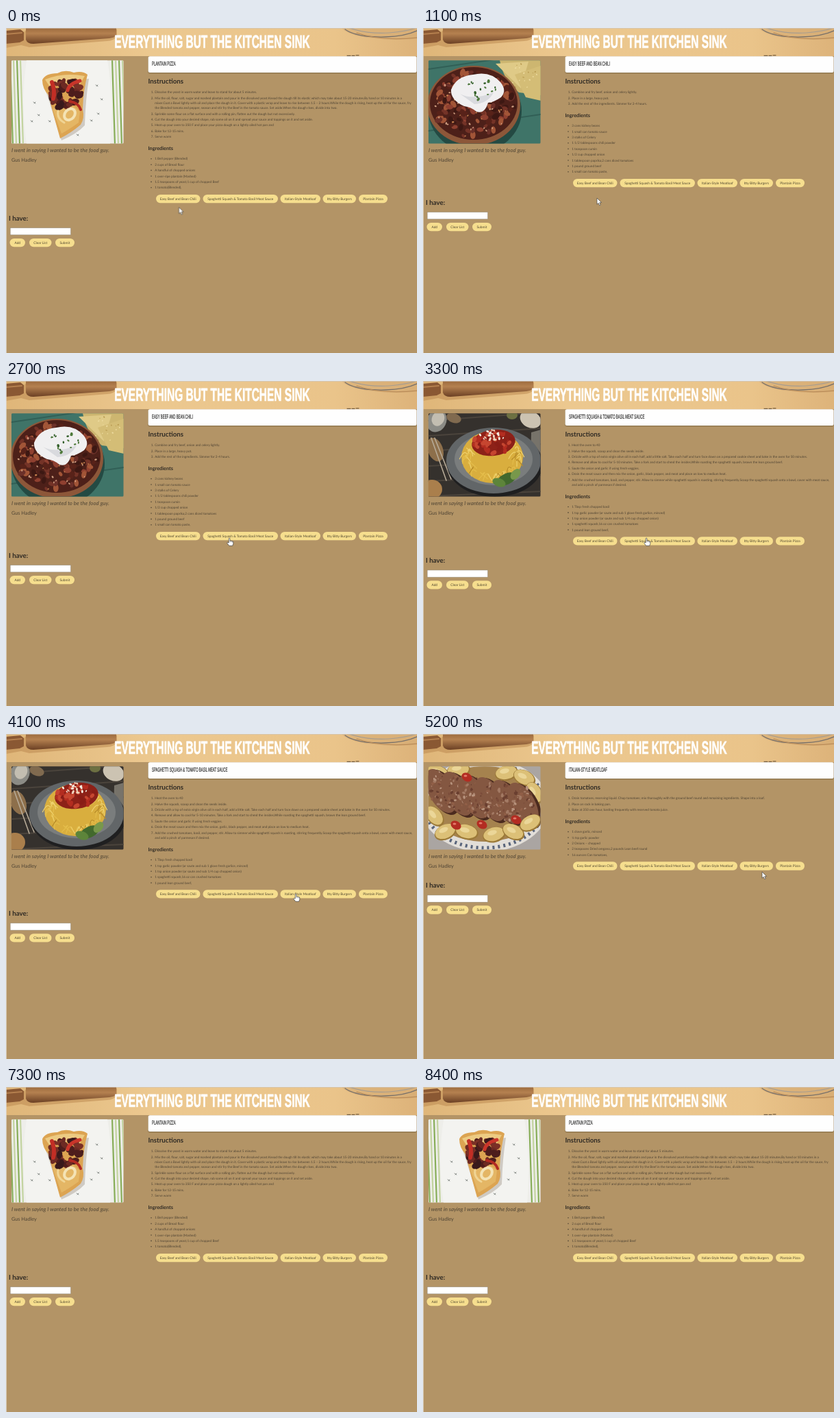
Recreate the animation shown at these times as an HTML page. Size 600 px wide and 474 px high, loop 8.5 s.

```html
<!DOCTYPE html>
<html lang="en">
<head>
<meta charset="utf-8">
<title>Everything but the kitchen sink</title>
<style>
html, body { margin: 0; width: 100%; height: 100%; overflow: hidden; background: #b39466; }
svg { display: block; width: 100vw; height: 100vh; text-rendering: geometricPrecision; }
text { font-family: Lato, "Open Sans", sans-serif; font-size: 4.69px; fill: #4f4434; white-space: pre; }
.h1 { font-size: 9.72px; font-weight: 700; fill: #2f2a24; }
.h2 { font-size: 7.3px; font-weight: 700; fill: #2f2a24; }
.name { font-size: 7.3px; }
.quote { font-size: 7.85px; font-style: italic; }
.btn { font-size: 4.9px; text-anchor: middle; fill: #4f452f; }
.num { text-anchor: end; }
.banner, .dish { font-family: "Liberation Sans", Arial, sans-serif; }
.banner { font-size: 26.4px; font-weight: 700; fill: #fff; stroke: #fff; stroke-width: .7px; text-anchor: middle; }
.dish { font-size: 8.8px; fill: #2a2a2a; stroke: #2a2a2a; stroke-width: .2px; }

.scene, .cursor, .hand, .arrow { animation: 8.5s step-end infinite; }
.scene { visibility: hidden; }
.pizza { animation-name: pizza; }
.chili { animation-name: chili; }
.squash { animation-name: squash; }
.loaf { animation-name: loaf; }
.burger { animation-name: burger; }
@keyframes pizza { 0% { visibility: visible } 12.94% { visibility: hidden } 77.64%, 100% { visibility: visible } }
@keyframes chili { 0% { visibility: hidden } 12.94% { visibility: visible } 34.11%, 100% { visibility: hidden } }
@keyframes squash { 0% { visibility: hidden } 34.11% { visibility: visible } 52.94%, 100% { visibility: hidden } }
@keyframes loaf { 0% { visibility: hidden } 52.94% { visibility: visible } 67.05%, 100% { visibility: hidden } }
@keyframes burger { 0% { visibility: hidden } 67.05% { visibility: visible } 77.64%, 100% { visibility: hidden } }

.cursor { animation-name: move; animation-timing-function: ease-in-out; }
@keyframes move {
  0%, 4.7% { transform: translate(252.5px, 261.5px) }
  10.59%, 13.5% { transform: translate(254px, 248px) }
  21.5%, 22.5% { transform: translate(296px, 241px) }
  29.4%, 39.5% { transform: translate(326px, 229px) }
  47.8%, 54.5% { transform: translate(423px, 233px) }
  60.6%, 61.4% { transform: translate(495px, 201px) }
  64.7%, 69% { transform: translate(490px, 191px) }
  74.5%, 79% { transform: translate(545px, 222.5px) }
  83.5%, 100% { transform: translate(604px, 226px) }
}
.hand { animation-name: hand; }
.arrow { animation-name: arrow; }
@keyframes hand {
  0% { opacity: 0 } 8.2% { opacity: 1 } 12.94% { opacity: 0 } 27% { opacity: 1 } 52.94% { opacity: 0 }
  62.9% { opacity: 1 } 67.05% { opacity: 0 } 72.9% { opacity: 1 } 77.64%, 100% { opacity: 0 }
}
@keyframes arrow {
  0% { opacity: 1 } 8.2% { opacity: 0 } 12.94% { opacity: 1 } 27% { opacity: 0 } 52.94% { opacity: 1 }
  62.9% { opacity: 0 } 67.05% { opacity: 1 } 72.9% { opacity: 0 } 77.64% { opacity: 1 } 83.5%, 100% { opacity: 0 }
}
.hover { animation: hover 8.5s step-end infinite; }
.hover text { fill: #94773a; }
@keyframes hover { 0% { opacity: 0 } 73.5% { opacity: 1 } 77.64%, 100% { opacity: 0 } }
</style>
</head>
<body>
<svg id="stage" viewBox="0 0 600 474" preserveAspectRatio="none"></svg>
<script>
let seed = 7;
const rnd = () => (seed = (seed * 16807) % 2147483647) / 2147483647;
const between = (a, b) => a + (b - a) * rnd();
const pick = list => list[Math.floor(rnd() * list.length)];

const rect = (x, y, w, h, fill, more = '') => `<rect x="${x}" y="${y}" width="${w}" height="${h}" fill="${fill}" ${more}/>`;
const oval = (x, y, rx, ry, fill, turn = 0, more = '') =>
  `<ellipse cx="${x}" cy="${y}" rx="${rx}" ry="${ry}" fill="${fill}" transform="rotate(${turn} ${x} ${y})" ${more}/>`;
const path = (d, fill, more = '') => `<path d="${d}" fill="${fill}" ${more}/>`;
const line = (d, color, width) => path(d, 'none', `stroke="${color}" stroke-width="${width}" stroke-linecap="round"`);
const text = (x, y, str, cls = '') => `<text x="${x}" y="${y}" class="${cls}">${str.replace(/&/g, '&amp;')}</text>`;
const times = (n, fn) => Array.from({ length: n }, (_, i) => fn(i)).join('');
const pill = (x1, x2, y, label, fill = '#f6de8e') =>
  rect(x1, y - 6.2, x2 - x1, 12.4, fill, 'rx="6.2"') + text((x1 + x2) / 2, y + 1.7, label, 'btn');

// Ovals strewn at random inside an elliptical area
function strew(n, x, y, w, h, r1, r2, colors) {
  return times(n, () => {
    const a = between(0, 6.283), d = Math.sqrt(rnd()), r = between(r1, r2);
    return oval((x + Math.cos(a) * d * w).toFixed(1), (y + Math.sin(a) * d * h).toFixed(1),
      r.toFixed(1), (r * .65).toFixed(1), pick(colors), Math.round(between(0, 180)));
  });
}

const photos = {
  pizza() {
    const stripes = (x, n) => times(n, i =>
      line(`M${x + i * 5} 46L${x + i * 5 + 4} 170`, i % 2 ? '#c3d4a0' : '#87ad58', 2.2));
    return rect(8, 47, 164, 122, '#eeeeea') + stripes(6, 4) + stripes(155, 4) +
      path('M30 47H148Q158 105 152 169H30Q21 110 30 47Z', '#f3f3f0') +
      path('M55 82Q64 110 81 164Q104 154 115 142Q116 105 121 74Z', '#cfcac3') +
      path('M53 76Q57 66 75 66Q86 60 99 65Q112 62 119 68Q113 90 112 118Q115 132 109 141Q95 153 79 161Q70 130 62 98Q53 88 53 76Z', '#dca452') +
      path('M57 75Q84 64 115 70L108 82Q84 76 64 86Z', '#edcb83') +
      path('M68 118Q90 102 108 122L106 138Q92 148 81 154Z', '#e4b665') +
      strew(46, 87, 96, 23, 20, 4, 7.5, ['#4d1d1c', '#6d2a23', '#39191b', '#7a3026']) +
      line('M67 79Q72 92 69 103', '#c22e25', 6) + line('M108 77Q92 81 90 91', '#c9352a', 5) +
      line('M93 107Q106 109 109 119', '#b12a22', 4) +
      oval(93, 126, 9, 7, 'none', -50, 'stroke="#f4e3b5" stroke-width="4"') +
      line('M76 121Q74 132 85 138', '#f0d494', 3) +
      [[41, 110], [47, 128], [37, 137], [132, 85], [134, 126], [124, 136], [63, 137], [139, 105], [104, 157]]
        .map(([x, y]) => line(`M${x} ${y}l2 -2m-3 0l3 2`, '#7f8581', .9)).join('');
  },
  chili() {
    return rect(8, 47, 164, 122, '#3f7468') + line('M8 150L172 126M8 60L172 36', '#315f56', 2) +
      path('M112 47H172V98L140 94Q118 78 112 47Z', '#cdb670') + path('M106 52L154 49L143 88Z', '#dfca87') +
      path('M134 68L172 55V106L150 101Z', '#d4bd76') + strew(20, 145, 72, 24, 20, .7, 1.5, ['#b99b51', '#efdda2']) +
      oval(76, 121, 68, 61, '#244a43') + oval(74, 113, 68, 58, '#8d5739') + oval(74, 110, 64, 53, '#4d2019') +
      strew(150, 74, 111, 60, 48, 3, 6.5, ['#743327', '#582219', '#8f4030', '#3d1813', '#a25537', '#6b3029']) +
      strew(45, 74, 113, 58, 46, 1, 2, ['#c9834f', '#d1a083']) +
      path('M41 90Q49 70 73 68Q98 62 113 79Q123 91 114 101Q104 108 95 109Q90 126 78 122Q70 115 60 114Q40 105 41 90Z', '#f0eff0') +
      path('M54 96Q73 106 103 94Q95 110 75 111Z', '#d9dade') +
      strew(18, 84, 90, 22, 16, 1.5, 2.8, ['#4f7a3b', '#35602c']);
  },
  squash() {
    return rect(8, 47, 164, 122, '#35312d') + times(6, i => line(`M8 ${58 + i * 22}L172 ${46 + i * 23}`, '#4b443c', 2)) +
      oval(20, 58, 14, 17, '#8b8b85', 25) + oval(22, 55, 9, 11, '#c3beb1', 25) +
      oval(18, 100, 11, 18, '#8d6f4b', -20) + line('M12 83L34 145M17 83L41 143', '#b6aa97', 1.6) +
      oval(45, 54, 11, 7, '#806a4f', 20) + oval(157, 56, 16, 12, '#ccc3b2', 25) + oval(130, 50, 8, 6, '#6d7042') +
      path('M158 75L172 71V132L157 118Z', '#77736a') + oval(13, 158, 15, 14, '#aa7f4c') +
      oval(105, 121, 70, 48, '#1f1f20') + oval(103, 116, 69, 48, '#626668') + oval(103, 114, 57, 38, '#7a7d7d') +
      oval(101, 111, 45, 38, '#d9ae3e') +
      times(65, () => {
        const a = between(0, 6.3), x = 101 + 37 * Math.cos(a), y = 110 + 28 * Math.sin(a);
        return line(`M${x.toFixed(1)} ${y.toFixed(1)}q${between(-10, 10).toFixed(1)} -7 ${between(-13, 13).toFixed(1)} 7`,
          pick(['#efd26e', '#e4bd4b', '#b88c29']), 1.2);
      }) +
      oval(103, 90, 32, 19, '#8d2118', -8) + strew(45, 103, 89, 29, 16, 2, 5, ['#b32d20', '#c64630', '#891d16']) +
      strew(25, 102, 79, 19, 8, 1, 2.6, ['#f0d6bd', '#f4ede0']) +
      oval(122, 143, 15, 8, '#42692d', -25) + oval(111, 148, 10, 6, '#5d843a', 20) + oval(135, 136, 9, 6, '#78984b', -50);
  },
  loaf() {
    const potato = ([x, y, a]) => oval(x, y, 17, 11, '#9c7a38', a) + oval(x - .5, y - 1, 15.5, 9.8, '#dcc077', a) +
      oval(x - 3, y - 3, 7, 3.5, '#ebd698', a);
    return rect(8, 47, 164, 122, '#aaa5a2') + oval(90, 104, 94, 68, '#e2ded8') +
      oval(90, 104, 88, 62, 'none', 0, 'stroke="#59657c" stroke-width="5" stroke-dasharray="3 5"') +
      oval(90, 102, 84, 55, '#a5824e') +
      [[22, 57, 20], [52, 53, -8], [122, 57, -12], [148, 64, 25], [163, 86, 60], [17, 120, 50]].map(potato).join('') +
      times(6, i => {
        const x = 26 + i * 24, y = 83 + i * 4;
        return oval(x + 4, y + 2, 19, 36, '#4b2b1f', -28) + oval(x, y, 18, 35, '#845741', -28) +
          strew(50, x, y, 16, 28, 1, 3.2, ['#a37a64', '#6a3f30', '#b7937d', '#7b4c3a', '#915f47']);
      }) +
      [[33, 143, -25], [64, 143, 12], [104, 147, -15], [132, 143, 25], [157, 130, -30]].map(potato).join('') +
      [[64, 63], [86, 132], [136, 125], [48, 133]].map(([x, y]) => oval(x, y, 8, 6, '#b32c22', 30) + oval(x - 2, y - 2, 2.5, 1.5, '#e4796b')).join('');
  },
  burger() {
    const bite = ([x, y, s]) => `<g transform="translate(${x} ${y}) scale(${s})">` +
      oval(3, 20, 21, 10, '#8b7660') + path('M-18 10L-2 21L19 11V18L1 29L-17 19Z', '#d3ab76') +
      path('M-18 1Q0 15 19 2V14Q2 28 -17 14Z', '#43241c') + strew(14, 0, 13, 15, 6, 1.5, 3.4, ['#613428', '#301a17', '#754433']) +
      path('M-20 1L-7 2L0 9L9 3L20 2L14 9L2 12L-12 8Z', '#e6d3a4') + line('M-16 5L-8 9L-2 10', '#56753c', 2.6) +
      path('M-19 -4L3 -14L20 -3L1 9Z', '#ae6932') + path('M-16 -4L3 -12L17 -4L1 5Z', '#d79e60') +
      strew(12, 0, -4, 11, 4, 1.5, 4, ['#a4592c', '#bd7a40', '#e2b67e']) + line('M1 -4L6 -27', '#d8b776', 1.4) + '</g>';
    return rect(8, 47, 164, 122, '#cdb99f') + rect(8, 47, 164, 16, '#8f7355') + oval(76, 126, 98, 58, '#eee7dc') +
      oval(82, 116, 86, 48, '#d8c5aa') +
      [[22, 61, .8], [62, 61, .85], [104, 61, .8], [147, 64, 1], [34, 96, 1.15], [86, 87, 1], [132, 95, 1.1], [81, 123, 1.25], [140, 131, 1.3]].map(bite).join('');
  }
};

// Each instruction is a list of its wrapped lines
const recipes = {
  pizza: {
    title: 'PLANTAIN PIZZA',
    steps: [
      ['Dissolve the yeast in warm water and leave to stand for about 5 minutes.'],
      ['Mix the oil, flour, salt, sugar and mashed plantain and pour in the dissolved yeast.Knead the dough till its elastic which may take about 15-20 minutes.By hand or 10 minutes in a',
        'mixer.Coat a Bowl lightly with oil and place the dough in it. Cover with a plastic wrap and leave to rise between 1.5 – 2 hours.While the dough is rising, heat up the oil for the sauce, fry',
        'the Blended tomato and pepper, season and stir fry the Beef in the tomato sauce. Set aside.When the dough rises, divide into two.'],
      ['Sprinkle some flour on a flat surface and with a rolling pin, flatten out the dough but not excessively.'],
      ['Cut the dough into your desired shape, rub some oil on it and spread your sauce and toppings on it and set aside.'],
      ['Heat up your oven to 350 F and place your pizza dough on a lightly oiled hot pan and'],
      ['Bake for 12-15 mins.'], ['Serve warm']],
    items: ['1 Bell pepper (Blended)', '2 cups of Bread flour', 'A handful of chopped onions', '1 over-ripe plantain (Mashed)', '1.5 teaspoons of yeast,1 cup of chopped Beef', '1 tomato(Blended),']
  },
  chili: {
    title: 'EASY BEEF AND BEAN CHILI',
    steps: [['Combine and fry beef, onion and celery lightly.'], ['Place in a large, heavy pot.'], ['Add the rest of the ingredients. Simmer for 2-4 hours.']],
    items: ['3 cans kidney beans', '1 small can tomato sauce', '3 stalks of Celery', '1 1/2 tablespoons chili powder', '1 teaspoon cumin', '1/2 cup chopped onion', '1 tablespoon paprika,2 cans diced tomatoes', '1 pound ground beef', '1 small can tomato paste,']
  },
  squash: {
    title: 'SPAGHETTI SQUASH & TOMATO BASIL MEAT SAUCE',
    steps: [['Heat the oven to 40'], ['Halve the squash, scoop and clean the seeds inside.'],
      ['Drizzle with a tsp of extra virgin olive oil in each half, add a little salt. Take each half and turn face down on a prepared cookie sheet and bake in the oven for 50 minutes.'],
      ['Remove and allow to cool for 5-10 minutes. Take a fork and start to shred the insides.While roasting the spaghetti squash, brown the lean ground beef.'],
      ['Saute the onion and garlic if using fresh veggies.'],
      ['Drain the meat sauce and then mix the onion, garlic, black pepper, and meat and place on low to medium heat.'],
      ['Add the crushed tomatoes, basil, and pepper, stir. Allow to simmer while spaghetti squash is roasting, stirring frequently.Scoop the spaghetti squash onto a bowl, cover with meat sauce,',
        'and add a pinch of parmesan if desired.']],
    items: ['1 Tbsp fresh chopped basil', '1 tsp garlic powder (or saute and sub 1 glove fresh garlice, minced)', '1 tsp onion powder (or saute and sub 1/4 cup chopped onion)', '1 spaghetti squash,16 oz can crushed tomatoes', '1 pound lean ground beef,']
  },
  loaf: {
    title: 'ITALIAN-STYLE MEATLOAF',
    steps: [['Drain tomatoes, reserving liquid. Chop tomatoes; mix thoroughly with the ground beef round and remaining ingredients. Shape into a loaf.'], ['Place on rack in baking pan.'], ['Bake at 350 one hour, basting frequently with reserved tomato juice.']],
    items: ['1 clove garlic, minced', '½ tsp garlic powder', '2 Onions – chopped', '2 teaspoons Dried oregano,2 pounds Lean beef round', '16 ounces Can tomatoes,']
  },
  burger: {
    title: 'ITTY BITTY BURGERS',
    steps: [
      ['Preheat oven to 400 degrees.In a medium bowl add 2 T of mustard and a generous pinch of salt to the ground beef. Using your hands, mix gently until everything is thoroughly', 'combined.'],
      ['Roll meat into very small balls, roughly 1 1/2 inches across and set on a rimmed cookie sheet. (I got 16 out of my batch.) Press each ball down gently to slightly flatten.'],
      ['Bake for 10 minutes, remove and lay a small piece of cheese over each burger. Return to oven for 1-2 more minutes until cheese is melted and burgers are cooked through.While the',
        'burgers are cooking, spread mustard on buns (if you like), and cut into 1-inch pieces. Prepare remaining ingredients and have everything ready when the burgers come out of the',
        'oven.Assemble burgers on toothpicks by stabbing some bread (mustard side down), then lettuce, then tomato, then a burger, then the other piece of bread (mustard side up). When you',
        'put them on a serving dish, press everything down a bit -- that will help them stand up.']],
    items: ['1 a handful of fresh baby spinach (or lettuce) cut into inch pieces', '2 hamburger buns', '2 slices pepper jack cheese, cut into 1 inch pieces', '3 tablespoons spicy mustard mustard- extra to spread,a handful of cherry or grape tomatoes, sliced thinly', '1 1/2 pounds lean ground beef (90% lean),']
  }
};

function controls(y) {
  return pill(219, 283.5, y, 'Easy Beef and Bean Chili') +
    pill(287.5, 397, y, 'Spaghetti Squash & Tomato Basil Meat Sauce') +
    pill(400.5, 459, y, 'Italian-Style Meatloaf') + pill(462.5, 511, y, 'Itty Bitty Burgers') +
    pill(515, 557, y, 'Plantain Pizza') + text(4, y + 31.5, 'I have:', 'h1') +
    rect(6.2, y + 42.5, 88.3, 10.2, '#fff', 'stroke="#8f8676" stroke-width=".5"') +
    pill(5.5, 28, y + 64, 'Add') + pill(34, 66.5, y + 64, 'Clear List') + pill(72, 100, y + 64, 'Submit');
}

function scene(key) {
  const { title, steps, items } = recipes[key];
  let y = 95.2, out = `<g clip-path="url(#photo)">${photos[key]()}</g>`;
  out += `<g transform="translate(213 55.2) scale(.497 1)">${text(0, 0, title, 'dish')}</g>`;
  steps.forEach((lines, i) => {
    out += text(215.7, y, i + 1 + '.', 'num');
    lines.forEach((str, j) => { out += text(217.2, y += j ? 7.3 : 0, str); });
    y += 8.4;
  });
  y += 9.6;
  out += text(207.5, y, 'Ingredients', 'h2');
  y += 14.2;
  items.forEach((str, i) => {
    const row = y + i * 8.4;
    out += oval(212, row - 1.6, .8, .8, '#4f4434') + text(217.2, row, str);
  });
  y += (items.length - 1) * 8.4 + 14.7;
  out += controls(y);
  if (key === 'burger') out += `<g class="hover">${pill(515, 557, y, 'Plantain Pizza', '#ebcf70')}</g>`;
  return `<g class="scene ${key}">${out}</g>`;
}

const header =
  rect(0, 0, 600, 41, 'url(#wood)') +
  path('M0 13L24 9L30 2H162V12Q157 19 148 19L34 28L22 25L0 29Z', '#b9854c', 'opacity=".5"') +
  path('M0 4L21 2L26 6V18L20 21L0 23Z', '#8a5833') + line('M0 9L23 7', '#b5804f', 2) +
  path('M29 0H161V10Q159 14 151 15L40 23Q31 23 29 17Z', 'url(#pin)') +
  path('M490 0H600V16Q560 19 520 13Q498 9 490 0Z', '#d3a972', 'opacity=".5"') +
  line('M495 2Q512 14 554 13Q584 12 602 3', '#77706a', 1.3) + line('M501 0Q528 9 560 7Q585 5 598 0', '#a69c90', 1.2) +
  line('M512 7Q548 20 602 14', '#b98b58', 1.2) +
  line('M498 40.3h5m2 0h4m2 -.4h4', '#5a4630', 1) +
  `<g transform="translate(301 29.3) scale(.586 1)">${text(0, 0, 'EVERYTHING BUT THE KITCHEN SINK', 'banner')}</g>`;

const panel =
  rect(207, 43, 393, 24, '#6c5636', 'rx="3" opacity=".2"') + rect(207.3, 42, 392.6, 24, '#6c5636', 'rx="3" opacity=".35"') +
  rect(207.6, 41.2, 392, 23.9, '#fefefe', 'rx="2.5"');

const cursor = `<g class="cursor"><g class="arrow">` +
  path('M0 0V9.2L2.1 7.3L3.6 10.7L5.2 10L3.7 6.7H6.6Z', '#fff', 'stroke="#333" stroke-width=".6" stroke-linejoin="round"') +
  `</g><g class="hand">` +
  path('M-.8 .5Q0 -.7 1 .5V4.3Q2 3.4 2.8 4.5Q3.8 3.8 4.5 4.9Q5.7 4.5 5.8 6V8.3L4.7 11.3H-.3L-3.2 7.4Q-3.3 5.6 -.8 7Z', '#fff', 'stroke="#333" stroke-width=".65" stroke-linejoin="round"') +
  line('M1 4.3V6M2.8 4.7V6.2M4.5 5V6.3', '#555', .4) + `</g></g>`;

document.getElementById('stage').innerHTML =
  `<defs>
    <linearGradient id="wood"><stop offset="0" stop-color="#dfb679"/><stop offset=".35" stop-color="#ecc88f"/><stop offset=".8" stop-color="#eac48a"/><stop offset="1" stop-color="#ddb37a"/></linearGradient>
    <linearGradient id="pin" x2="0" y2="1"><stop offset="0" stop-color="#9c6a3c"/><stop offset=".35" stop-color="#b58150"/><stop offset="1" stop-color="#6b4024"/></linearGradient>
    <clipPath id="photo"><rect x="7.8" y="47.2" width="163.7" height="121.4" rx="1.5"/></clipPath>
  </defs>` +
  rect(0, 0, 600, 474, '#b39466') + header + panel + rect(0, 0, .8, 474, '#e0d9ce') + rect(0, 0, 600, .7, '#cfc8bf') +
  text(207.5, 81.2, 'Instructions', 'h1') +
  text(8, 181, 'I went in saying I wanted to be the food guy.', 'quote') + text(8, 194.5, 'Gus Hadley', 'name') +
  Object.keys(recipes).map(scene).join('') + cursor;
</script>
</body>
</html>
```
